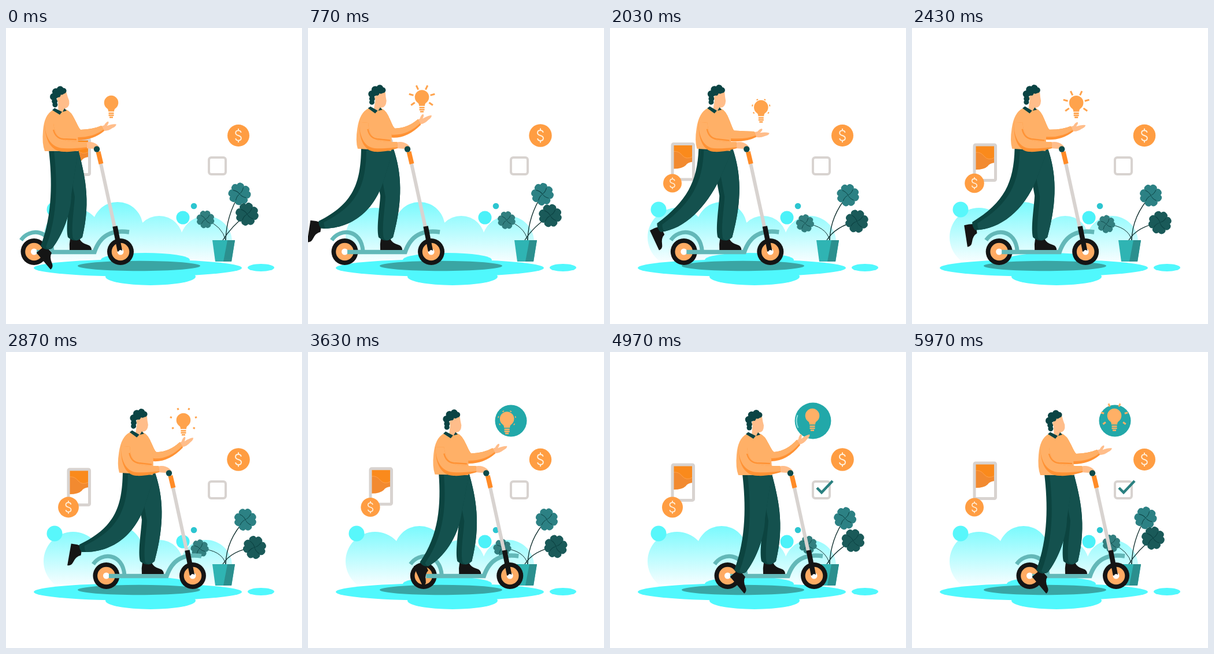
An HTML page with a canvas for the animation above (6000 ms loop, 512x512 px).

```html
<!DOCTYPE html>
<html>
<head>
<meta charset="utf-8">
<style>
html, body { margin: 0; height: 100%; overflow: hidden; background: #fff }
canvas { display: block; width: 100vw; height: 100vh }
</style>
</head>
<body>
<canvas id="stage" width="512" height="512"></canvas>
<script>
const g = document.getElementById('stage').getContext('2d');
const LOOP = 6000, TRAVEL = 155, TAU = Math.PI * 2, DEG = Math.PI / 180;
const SHIRT = '#ffb067', SHADE = '#ff9234', SKIN = '#ffbd8a', HAIR = '#0b4444';
const PANTS = '#14514e', PANTS_DARK = '#0c4440', BLACK = '#151515', AQUA = '#50f8fd';

const mix = (a, b, u) => a + (b - a) * u;
const mixAll = (a, b, u) => a.map((v, i) => mix(v, b[i], u));
const ease = (t, from, to) => {
  const u = Math.min(1, Math.max(0, (t - from) / (to - from)));
  return u * u * (3 - 2 * u);
};
const wave = (t, period) => (1 - Math.cos(TAU * t / period)) / 2;

function fill(color, d) {
  g.fillStyle = color;
  g.fill(new Path2D(d));
}
function line(color, width, d) {
  g.strokeStyle = color;
  g.lineWidth = width;
  g.stroke(new Path2D(d));
}
function oval(color, x, y, rx, ry = rx) {
  g.fillStyle = color;
  g.beginPath();
  g.ellipse(x, y, rx, ry, 0, 0, TAU);
  g.fill();
}
function at(x, y, angle, scale, draw) {
  g.save();
  g.translate(x, y);
  g.rotate(angle * DEG);
  g.scale(scale, scale);
  draw();
  g.restore();
}

function scenery() {
  const sky = g.createLinearGradient(0, 300, 0, 406);
  sky.addColorStop(0, '#78fafd');
  sky.addColorStop(1, '#fafeff');
  g.save();
  g.beginPath();
  g.rect(0, 0, 512, 402);
  g.clip();
  g.beginPath();
  for (const [x, y, r] of [[116, 362, 51], [193, 345, 44], [265, 366, 41], [346, 370, 45]]) {
    g.moveTo(x + r, y);
    g.arc(x, y, r, 0, TAU);
  }
  g.rect(90, 362, 285, 40);
  g.fillStyle = sky;
  g.fill();
  g.restore();
  oval('#58f7fb', 84, 314, 13.5);
  oval('#4cf2f9', 306, 328, 11.5);
  oval('#2cc5d0', 325, 308, 5.3);
  oval(AQUA, 228, 415, 180, 15);
  oval(AQUA, 241, 401, 77, 12);
  oval(AQUA, 250, 430, 78, 15);
  oval(AQUA, 441, 414.5, 23, 6.5);
  oval('#3aa5a4', 230, 411.5, 106, 8.7);
}

function coin(x, y, r) {
  oval('#ff9d42', x, y, r);
  at(x, y, 0, r / 19, () => line('#fff0dc', 1.9,
    'M4.6 -5Q4 -8.6 0 -8.6Q-4.8 -8.6 -4.8 -4.6Q-4.8 -1.4 0 0Q4.8 1.4 4.8 4.6Q4.8 8.6 0 8.6Q-4.2 8.6 -4.8 4.8M0 -12V-8.6M0 8.6V12'));
}

function phone(dy) {
  at(0, dy, 0, 1, () => {
    g.fillStyle = '#fff';
    g.fillRect(108, 192, 37, 62);
    fill('#fa8a1c', 'M110 194H143V222H110Z');
    fill('#f28a30', 'M110 205Q119 204 125 212Q132 220 143 214V223Q134 224 131 229Q125 235 110 235Z');
    line('#ffa24c', 1, 'M110 205Q119 204 125 212Q132 220 143 214');
    g.strokeStyle = '#d8d3d0';
    g.lineWidth = 5;
    g.beginPath();
    g.roundRect(108, 192, 36.5, 61.5, 2);
    g.stroke();
  });
}

function checkbox(t) {
  g.strokeStyle = '#d8d3d0';
  g.lineWidth = 4;
  g.beginPath();
  g.roundRect(351, 224, 29, 29, 4);
  g.stroke();
  const u = ease(t, 4000, 4500);
  if (!u) return;
  g.save();
  g.setLineDash([40 * u, 60]);
  line('#2a8080', 4.5, 'M358 235L366 243L385 223');
  g.restore();
}

function clover(color, x, y, scale, angle) {
  at(x, y, angle, scale, () => {
    for (let i = 0; i < 4; i++) {
      fill(color, 'M0 0C-15 -6 -14 -17 -7 -18Q-2 -19 0 -15.5Q2 -19 7 -18C14 -17 15 -6 0 0');
      line('#0b3f40', .9, 'M0 0Q2.5 -6 0 -13');
      g.rotate(Math.PI / 2);
    }
  });
}

function plant(w) {
  const top = [mix(404, 414, w), mix(287, 290, w)];
  const mid = [mix(417, 430, w), mix(322, 338, w)];
  const low = [mix(345, 335, w), mix(331, 340, w)];
  const ink = '#12302f';
  line(ink, 1.4, `M380 367Q381 325 ${top}`);
  line(ink, 1.4, `M375 367Q390 343 ${mid}`);
  line(ink, 1, `M380 367Q374 343 ${low}`);
  clover('#2c8184', ...top, 1, 30 + 14 * w);
  clover('#1a5a59', ...mid, 1.03, 38 + 16 * w);
  clover('#327f7f', ...low, .8, 42 - 14 * w);
  fill('#2fb4b3', 'M357 367H396L390 404H362Z');
  fill('#2b8f8e', 'M383 367H396L390 404H376Z');
}

function bulb(x, y, t, lit) {
  const color = lit ? '#ffb066' : '#ffa34c';
  at(x, y, 0, 1, () => {
    fill(color, 'M-5 14.5Q-5 10 -8 8.5A12.3 12.3 0 1 1 8 8.5Q5 10 5 14.5Z');
    line(color, 2.6, 'M-4.5 17.5H4.5M-4.5 21H4.5M-3 24.5H3');
    // bursts of rays slide outwards
    const age = t < 300 ? 2 : (t - 300) % 1650 / 1000;
    if (age >= 1) return;
    const head = mix(16, 24, ease(age, 0, .6));
    const tail = mix(14.5, 21, ease(age, .35, 1));
    for (let i = 0; i < 6; i++) {
      const a = (i * 50 - 215) * DEG;
      const c = Math.cos(a), s = Math.sin(a);
      line(color, 3, `M${c * tail} ${s * tail}L${c * head} ${s * head}`);
    }
  });
}

function idea(t, shift, swing, kick) {
  const rise = ease(t, 3150, 3950);
  const x = mix(337 + shift, 350, rise);
  const y = mix(130 + 8 * kick - 20 * swing, 111, rise);
  const grow = ease(t, 3100, 3500);
  const beat = t > 4650 && t < 5850 ? wave(t - 4650, 1200) : 0;
  const r = 27.5 * grow + 7 * beat;
  if (r) oval('#22a8a9', 351, 119, r);
  if (beat > .3) {
    g.strokeStyle = '#8edfdf';
    g.lineWidth = 2;
    g.beginPath();
    g.arc(351, 119, r - 3, 2.7, 3.5);
    g.stroke();
  }
  bulb(x, y, t, grow > .5);
}

function wheel(x) {
  oval(BLACK, x, 387, 23);
  oval('#ffab63', x, 387, 15.3);
  oval('#fff', x, 387, 5.5);
}

function scooter() {
  wheel(203.5);
  wheel(353);
  line('#63b8b8', 7, 'M181 367C195 346 232 347 235 386');
  line('#63b8b8', 7.5, 'M208 387.5H308C318 358 338 349 368 353');
  line('#d8d3d0', 6, 'M319 235L343 345');
  line('#ff8b27', 8, 'M314.5 214L319.5 235');
  line(BLACK, 8.5, 'M343.5 343L352 386');
  oval('#fff', 353, 387, 3);
}

function shoe(x, y, angle) {
  at(x, y, angle, 1, () =>
    fill(BLACK, 'M-8 -5L8 -5Q11 3 22 6Q29 8 29 15H-9Q-10 5 -8 -5'));
}

function trouser(d) {
  const path = new Path2D(d);
  g.save();
  g.fillStyle = PANTS_DARK;
  g.fill(path);
  g.clip(path);
  g.translate(9, 2);
  g.fillStyle = PANTS;
  g.fill(path);
  g.restore();
}

// waist, outer edge, cuff, inner edge, crotch, then ankle x, y and angle
const STAND = [229, 211, 235, 262, 236, 322, 215, 377, 224, 387, 235, 381, 252, 360, 268, 320, 268, 288, 225, 386, 50];
const BACK = [232, 209, 231, 268, 218, 304, 157, 333, 156, 340, 161, 346, 205, 348, 252, 325, 272, 260, 156, 343, 100];
const LOW = [229, 209, 227, 266, 208, 300, 157, 338, 157, 347, 163, 353, 205, 348, 242, 310, 266, 260, 162, 352, 65];

function legs(kick, dip) {
  const p = mixAll(STAND, mixAll(BACK, LOW, dip), kick);
  const right = mix(280, 288, kick), up = mix(211, 209, kick);
  shoe(274, 369, 0);
  trouser(`M250 ${up}H${right}C${right + 10 + 4 * kick} 250 ${mix(303, 305, kick)} 297 287 362Q275 373 262 362
    C258 345 264 310 265 290Z`);
  shoe(p[18], p[19], p[20]);
  trouser(`M${p[0]} ${p[1]}C${p.slice(2, 8)}Q${p.slice(8, 12)}C${p.slice(12, 18)}L${right} ${up}Z`);
}

function head() {
  fill(SKIN, 'M248 112H263Q264 120 266 127Q266 138 259 139Q256 139 256 146L245 145Z');
  for (const [x, y, r] of [[240, 117, 6.2], [245, 109, 6.2], [253, 106, 6], [258.5, 109, 5], [247, 114, 6], [255, 111, 4.5], [241, 125, 5], [241, 131, 4.5]])
    oval(HAIR, x, y, r);
  oval(SKIN, 248.5, 123, 3, 4);
}

function raisedArm(swing) {
  const top = [mix(320, 323, swing), mix(169, 152, swing)];
  const end = [mix(325, 329, swing), mix(178, 161, swing)];
  const low = 194 - 5 * swing;
  at(mix(322, 325, swing), mix(174, 157, swing), -18 * swing, .95, () =>
    fill(SKIN, 'M-3 -4L3 -6Q6 -12 10 -13Q13 -12 8 -5Q18 -9 25 -8Q25 -4 18 -1Q10 5 2 4Z'));
  const arm = drop => `M262 143C274 152 278 170 284 ${176 - 3 * swing}Q306 ${175 - 4 * swing} ${top}
    L${end[0] - drop / 4} ${end[1] - drop / 2}Q306 ${low - drop} 279 ${low - drop}Z`;
  fill(SHADE, arm(0));
  fill(SHIRT, arm(5));
}

function restingArm(lean, dx) {
  const c = Math.cos(lean * DEG), s = Math.sin(lean * DEG);
  const turn = (x, y) => [255 + dx + (x - 255) * c - (y - 212) * s, 212 + (x - 255) * s + (y - 212) * c];
  const sleeve = drop => `M${turn(222, 165)}C${turn(222, 192 - drop)} ${turn(232, 214 - drop)} 255 ${214 - drop}
    C270 ${215 - drop} 285 ${211 - drop * .6} 295 ${208 - drop / 3}L294 197C280 197 262 197 ${turn(250, 192)}
    C${turn(242, 186)} ${turn(238, 175)} ${turn(237, 165)}Z`;
  fill(SKIN, 'M292 198Q304 195 313 202Q318 206 316 213L311 209Q303 209 293 208Z');
  fill(SHADE, sleeve(0));
  fill(SHIRT, sleeve(6));
  line(SHADE, 2.4, `M${turn(237, 176)}Q${turn(241, 191)} ${turn(254, 192)}L${turn(277, 193)}`);
  oval('#0d4a49', 312, 209.5, 5.2);
}

function rider(t, kick, swing) {
  const dip = ease(t, 1200, 2000) * (1 - ease(t, 2050, 2850));
  const lean = 4 * kick, dx = 4 * kick;
  const nod = 1 - ease(t, 0, 700) + ease(t, 5050, 5900);
  legs(kick, dip);
  g.save();
  g.translate(255 + dx, 212 - 2 * kick);
  g.rotate(lean * DEG);
  g.translate(-255, -212);
  raisedArm(swing - .45 * kick * (1 - swing));
  at(254, 141, -7 * nod, 1, () => {
    g.translate(-254, -141);
    head();
  });
  fill(SHIRT, 'M236 142Q221 150 219 178Q217 200 222 213H280Q281 185 274 160Q270 145 257 140Q248 151 236 142');
  fill(HAIR, 'M235 142L239 138.5L252 145L248 150ZM253 145L256 139L260 143Z');
  g.restore();
  restingArm(lean, dx);
}

function render(t) {
  const shift = TRAVEL * (ease(t, 0, 4000) - 1);
  const kick = ease(t, 0, 850) * (1 - ease(t, 3000, 4000));
  const swing = wave(t, 2000), sway = wave(t, LOOP);
  g.clearRect(0, 0, 512, 512);
  scenery();
  phone(11 * sway);
  coin(108, 268.5, 16 + 2 * swing);
  coin(402, 186, 19 + .8 * swing);
  checkbox(t);
  plant(sway);
  idea(t, shift, swing, kick);
  at(shift, 0, 0, 1, () => {
    scooter();
    rider(t, kick, swing);
  });
}

function tick() {
  render(performance.now() % LOOP);
  requestAnimationFrame(tick);
}
tick();
</script>
</body>
</html>
```
